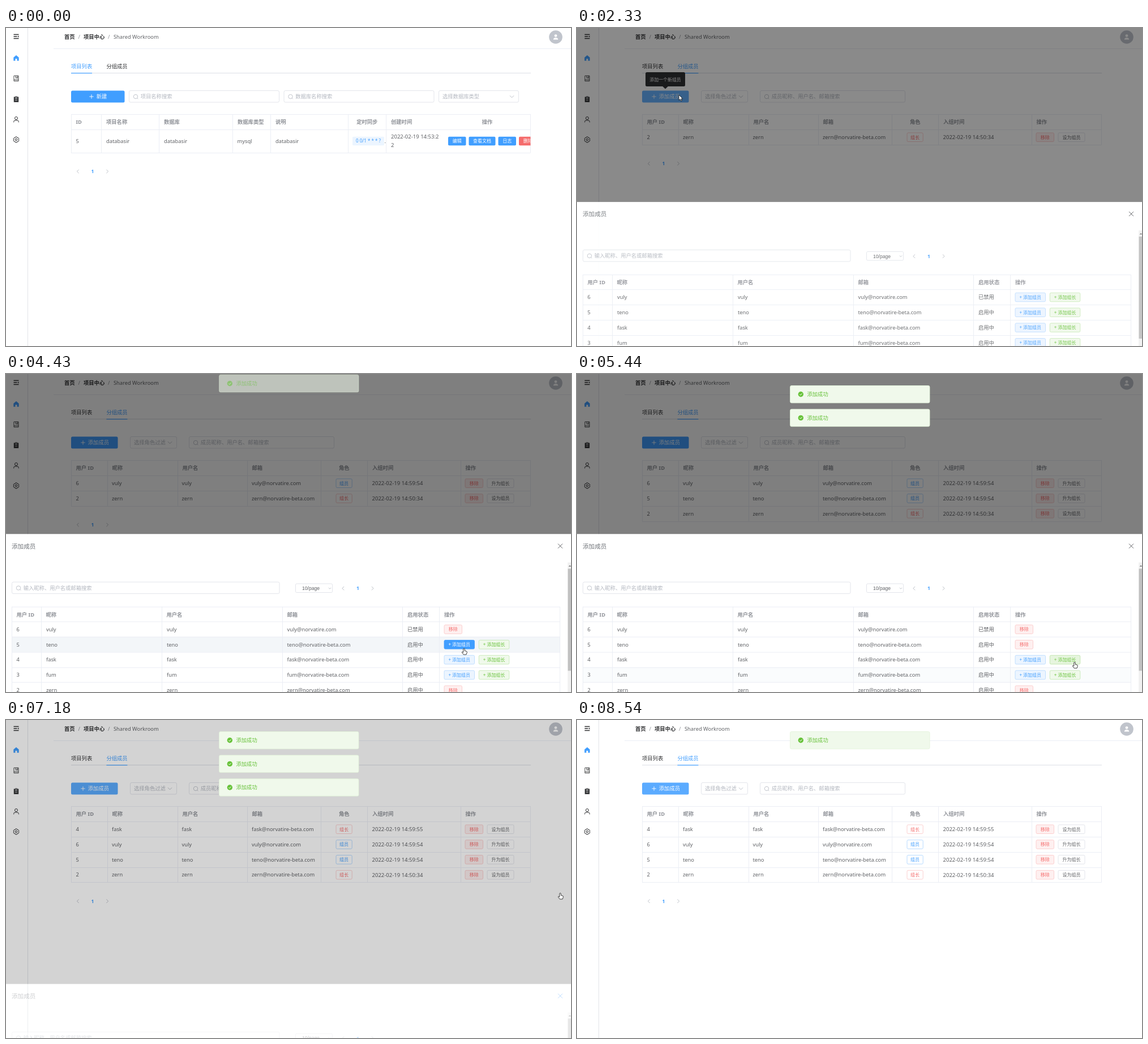
Animation, 998 px wide and 561 px high, one loop 8600 ms. Source, as an HTML page with a canvas:

```html
<!DOCTYPE html>
<html lang="zh-CN">
<head>
<meta charset="utf-8">
<style>
  html, body { margin: 0; width: 100%; height: 100%; overflow: hidden; background: #fff; }
  canvas { display: block; }
</style>
</head>
<body>
<canvas id="stage" width="998" height="561"></canvas>
<script>
const ctx = document.getElementById('stage').getContext('2d');
const LOOP = 8600;
const SANS = '"Noto Sans", "Noto Sans CJK SC", "Noto Sans CJK", sans-serif';
const BLUE = '#409eff', LIGHT_BLUE = '#66b1ff', RED = '#f56c6c', GREEN = '#67c23a';
const INK = '#303133', BODY = '#606266', GRAY = '#909399', HINT = '#b4b8c0', EDGE = '#dcdfe6', GRID = '#ebeef5';

// Timeline (ms)
const TAB_CLICK = 1100, OPEN = 2138, CLOSE = 7066, SLIDE = 300;
const JOINED = [4335, 5020, 5800], TOAST_LIFE = 3000;

const MAIL = '@norvatire-beta.com';
const user = (id, name, mail, role, time) => ({ id, name, mail: name + mail, role, time: '2022-02-19 14:' + time });
const vuly = user(6, 'vuly', '@norvatire.com', '组员', '59:54');
const teno = user(5, 'teno', MAIL, '组员', '59:54');
const fask = user(4, 'fask', MAIL, '组长', '59:55');
const fum = user(3, 'fum', MAIL);
const zern = user(2, 'zern', MAIL, '组长', '50:34');
const everyone = [vuly, teno, fask, fum, zern];

// [row, from, to] while the pointer is over a row or one of its buttons
const rowHovers = [[0, 3350, 4100], [1, 4100, 4840], [2, 4840, 4980], [3, 4980, 5370], [2, 5430, 6000]];
const buttonHovers = [[0, 3600, 4060], [1, 4200, 4780], [2, 5430, 5950]];

// [time, x, y, hand]
const route = [
  [200, 877, 512], [600, 450, 190], [860, 240, 40], [1010, 196, 66, 1], [1150, 196, 66], [1650, 180, 118],
  [2400, 180, 118], [2860, 640, 400], [3070, 640, 400], [3430, 850, 462, 1], [3680, 806, 453, 1],
  [3950, 806, 453, 1], [4250, 809, 484, 1], [4700, 809, 484], [5130, 860, 526], [5400, 879, 508, 1],
  [5900, 879, 508], [6430, 988, 400], [6800, 979, 305, 1], [7380, 979, 305], [8200, 972, 535], [8400, 966, 575]
];

const clamp = p => Math.max(0, Math.min(1, p));
function ease(p) {
  let low = 0, high = 1;
  for (let i = 0; i < 18; i++) {
    const u = (low + high) / 2;
    if (0.75 * u * (1 - u) + u ** 3 < p) low = u; else high = u;
  }
  const u = (low + high) / 2, v = 1 - u;
  return 0.3 * u * v * v + 3 * u * u * v + u ** 3;
}
const ramp = (t, start, duration) => {
  const p = clamp((t - start) / duration);
  return p === 0 || p === 1 ? p : ease(p);
};
const hovered = (list, row, t, fade) => list.reduce(
  (sum, [r, from, to]) => r === row ? sum + ramp(t, from, fade) - ramp(t, to, fade) : sum, 0);
function mix(a, b, p) {
  const part = (c, i) => parseInt(c.slice(i, i + 2), 16);
  return `rgb(${[1, 3, 5].map(i => Math.round(part(a, i) + (part(b, i) - part(a, i)) * p))})`;
}

function text(s, x, y, color = BODY, { size = 9.31, bold, align = 'left', font = SANS } = {}) {
  ctx.font = `${bold ? 'bold ' : ''}${size}px ${font}`;
  ctx.textAlign = align;
  ctx.fillStyle = color;
  ctx.fillText(s, x, y + size * 0.36);
}
const date = (s, x, y) => text(s, x, y, BODY, { size: 9.52 });
function box(x, y, w, h, fill, border, radius = 2.5) {
  ctx.beginPath();
  ctx.roundRect(x, y, w, h, radius);
  if (fill) { ctx.fillStyle = fill; ctx.fill(); }
  if (border) { ctx.strokeStyle = border; ctx.lineWidth = 0.8; ctx.stroke(); }
}
function rect(x, y, w, h, color) {
  ctx.fillStyle = color;
  ctx.fillRect(x, y, w, h);
}
function shape(d, x, y, { stroke, fill, width = 1 }) {
  const path = new Path2D(d);
  ctx.save();
  ctx.translate(x, y);
  ctx.lineWidth = width;
  ctx.lineJoin = 'round';
  if (fill) { ctx.fillStyle = fill; ctx.fill(path); }
  if (stroke) { ctx.strokeStyle = stroke; ctx.stroke(path); }
  ctx.restore();
}
function circle(x, y, r, fill, stroke) {
  ctx.beginPath();
  ctx.arc(x, y, r, 0, 7);
  if (fill) { ctx.fillStyle = fill; ctx.fill(); }
  if (stroke) { ctx.strokeStyle = stroke; ctx.lineWidth = 0.8; ctx.stroke(); }
}
function faded(alpha, draw) {
  if (alpha <= 0) return;
  ctx.save();
  ctx.globalAlpha = alpha;
  draw();
  ctx.restore();
}

function pill(label, x, y, w, fill, border, color) {
  box(x, y - 7.8, w, 15.6, fill, border, 2);
  text(label, x + w / 2, y, color, { size: 8, align: 'center' });
}
const removeButton = (x, y) => pill('移除', x, y, 31.5, '#fef0f0', '#fbc4c4', RED);
const chevronDown = (x, y) => shape('M-3.5-1.7 0 1.8 3.5-1.7', x, y, { stroke: HINT, width: 0.9 });
function search(x, y, w, hint) {
  box(x + 0.5, y - 10.5, w - 1, 20.5, '#fff', EDGE);
  circle(x + 12, y, 3.7, null, HINT);
  shape('M2.6 2.6 4.3 4.3', x + 12, y, { stroke: HINT, width: 0.8 });
  text(hint, x + 20.7, y, HINT);
}
function select(x, w, hint) {
  box(x + 0.5, 110.5, w - 1, 20.5, '#fff', EDGE);
  text(hint, x + 7, 121, HINT);
  chevronDown(x + w - 12.5, 121);
}
function primary(label, w, plusX, color) {
  box(115, 110.5, w, 21, color);
  shape('M-3.7 0H3.7M0-3.7V3.7', plusX, 121, { stroke: '#fff', width: 0.9 });
  text(label, plusX + 8.8, 121, '#fff');
}
function pager(x, y) {
  shape('M1.6-3.2-1.6 0 1.6 3.2M50.4-3.2 53.6 0 50.4 3.2', x, y, { stroke: HINT, width: 0.9 });
  text('1', x + 26, y, BLUE, { size: 8.6, bold: true, align: 'center' });
}
function grid(edges, top, bottoms, headers, centered) {
  const left = edges[0], right = edges[edges.length - 1], bottom = bottoms[bottoms.length - 1];
  for (const y of [top, ...bottoms]) rect(left, Math.round(y), right - left, 1, GRID);
  for (const x of edges) rect(Math.floor(x), top, 1, bottom - top, GRID);
  headers.forEach((label, i) => {
    const middle = i === centered;
    const x = middle ? (edges[i] + edges[i + 1]) / 2 : edges[i] + 8.5;
    text(label, x, top + 14, GRAY, { bold: true, align: middle ? 'center' : 'left' });
  });
}

function chrome(t) {
  rect(38, 0, 1, 561, '#e2e4e9');
  rect(84, 36, 914, 1, GRID);
  const dark = { stroke: INK, width: 1 };
  shape('M-4.5-3.5H4.5M-4.5 0H1.5M-4.5 3.5H4.5', 18, 15, { stroke: INK, width: 1.3 });
  shape('M4.5-1.8V1.8L2.3 0Z', 18, 15, { fill: INK });
  shape('M0-5 4.7-1V4.8H1.5V1.2H-1.5V4.8H-4.7V-1Z', 18, 53, { fill: BLUE });
  shape('M-4-4.7H4V4.7H-4ZM-4 2.4H4M-.5-4.7V-.2L1-1.4 2.5-.2V-4.7', 18, 89, { stroke: INK, width: 0.9 });
  shape('M-4.2-4H-2V-5H2V-4H4.2V5.2H-4.2Z', 18, 125.5, { fill: INK });
  shape('M-2.2-1.2H2.2M-2.2 1.7H2.2M-1.8-3.4H1.8', 18, 125.5, { stroke: '#fff', width: 0.8 });
  shape('M2.5-2.4A2.5 2.5 0 1 1-2.5-2.4 2.5 2.5 0 1 1 2.5-2.4M-4.3 5V3.8Q-4.3 1.5-2 1.5H2Q4.3 1.5 4.3 3.8V5', 18, 161.5, dark);
  shape('M-1.3-4.9H1.3L1.9-3.4 3.6-3.4 4.9-1.2 4 0 4.9 1.2 3.6 3.4 1.9 3.4 1.3 4.9H-1.3L-1.9 3.4-3.6 3.4-4.9 1.2-4 0-4.9-1.2-3.6-3.4-1.9-3.4ZM1.8 0A1.8 1.8 0 1 1-1.8 0 1.8 1.8 0 1 1 1.8 0', 18, 197, dark);
  text('首页', 103, 16, INK, { bold: true });
  text('/', 127.5, 16, GRAY);
  text('项目中心', 137, 16, INK, { bold: true });
  text('/', 180, 16, GRAY);
  text('Shared Workroom', 190, 16);
  circle(971, 16, 11.8, '#c0c4cc');
  circle(971, 13.6, 2.4, '#fff');
  shape('M-4.2 4.6Q-4.2 1 0 1T4.2 4.6Z', 971, 16, { fill: '#fff' });

  const moved = ramp(t, TAB_CLICK, SLIDE);
  rect(115, 79, 812, 1, EDGE);
  rect(115 + 62.4 * moved, 79, 37, 1.2, BLUE);
  text('项目列表', 115, 67.5, mix(BLUE, INK, moved));
  text('分组成员', 177.4, 67.5, mix(INK, BLUE, ramp(t, 950, 150)));
}

function projects() {
  primary('新建', 94.5, 151, BLUE);
  search(217, 121, 266, '项目名称搜索');
  search(490.5, 121, 266, '数据库名称搜索');
  select(764, 142, '选择数据库类型');
  grid([115, 168.5, 270.5, 400.5, 467.5, 604, 671.5, 926.5], 152, [179, 220],
    ['ID', '项目名称', '数据库', '数据库类型', '说明', '定时同步', '创建时间'], 5);
  text('操作', 850, 166, GRAY, { bold: true, align: 'center' });
  [['5', 123.5], ['databasir', 177], ['databasir', 279], ['mysql', 408.5], ['databasir', 476], ['.', 668.5]]
    .forEach(([s, x]) => text(s, x, 200));
  pill('0 0/1 * * * ?', 612, 199.5, 56, '#ecf5ff', null, BLUE);
  date('2022-02-19 14:53:2', 680, 192);
  date('2', 680, 207);
  ctx.save();
  ctx.beginPath();
  ctx.rect(772, 180, 154.5, 40);
  ctx.clip();
  [['编辑', 781, 31.5], ['查看文档', 817.5, 47], ['日志', 869.5, 31.5], ['删除', 906, 31.5]]
    .forEach(([label, x, w], i) => pill(label, x, 199.5, w, i < 3 ? BLUE : RED, null, '#fff'));
  ctx.restore();
  pager(127, 253);
}

function members(t) {
  const list = [vuly, teno].filter((_, i) => t >= JOINED[i]).concat(zern);
  if (t >= JOINED[2]) list.unshift(fask);
  const press = ramp(t, 2040, 60) - ramp(t, OPEN, 100);
  const focus = ramp(t, 1550, 100) - ramp(t, 2600, 200) + ramp(t, CLOSE - 40, 100) * 0.7;
  primary('添加成员', 82.5, 136, press > 0 ? mix(LIGHT_BLUE, '#3a8ee6', press) : mix(BLUE, LIGHT_BLUE, focus));
  select(219, 83, '选择角色过滤');
  search(323, 121, 257, '成员昵称、用户名、邮箱搜索');
  grid([115, 179, 303, 426, 556, 638.5, 803, 926.5], 152, [179, ...list.map((_, i) => 206 + 26.8 * i)],
    ['用户 ID', '昵称', '用户名', '邮箱', '角色', '入组时间', '操作'], 4);
  list.forEach((m, i) => {
    const y = 192.7 + 26.8 * i, lead = m.role === '组长';
    [[m.id, 123.5], [m.name, 187], [m.name, 310.5], [m.mail, 434]]
      .forEach(([s, x]) => text(s, x, y));
    date(m.time, 646.5, y);
    pill(m.role, 583, y, 28.2, '#fff', lead ? '#fbc4c4' : '#a6d2ff', lead ? RED : BLUE);
    removeButton(811, y);
    pill(lead ? '设为组员' : '升为组长', 850, y, 47, '#fff', EDGE, BODY);
  });
  pager(127, 212.4 + 26.8 * list.length);
  faded(ramp(t, 1680, 150) - ramp(t, 2400, 200), () => {
    box(121, 78, 70, 25, INK);
    shape('M-5 0H5L0 4.8Z', 156, 102.8, { fill: INK });
    text('添加一个新组员', 156, 90.7, '#fff', { size: 7.95, align: 'center' });
  });
}

function drawer(t, top) {
  ctx.save();
  ctx.translate(0, top);
  rect(0, 0, 998, 279, '#fff');
  text('添加成员', 10, 21.5, '#72767b', { size: 10.6 });
  shape('M-4-4 4 4M4-4-4 4', 979, 21, { stroke: mix(BODY, BLUE, ramp(t, 6750, 150)), width: 1 });
  search(10, 95, 473.5, '输入昵称、用户名或邮箱搜索');
  box(511.5, 87.5, 65, 15.5, '#fff', EDGE, 2);
  text('10/page', 523, 95.5, BODY, { size: 8.6, font: '"Liberation Sans", sans-serif' });
  shape('M-2.2-1 0 1.2 2.2-1', 572, 95.5, { stroke: HINT, width: 0.8 });
  pager(595.5, 95.7);
  rect(992, 50, 6, 229, '#f1f1f1');
  shape('M-2.4 1.3H2.4L0-1.3Z', 996, 56, { fill: '#808080' });
  rect(992.5, 61, 5.5, 180, '#c1c1c1');

  everyone.forEach((_, i) => faded(hovered(rowHovers, i, t, 200), () =>
    rect(10, 154.5 + 26.8 * i, 968, 26.8, '#f3f6f9')));
  grid([10, 62, 275, 488, 700.5, 765.5, 978], 128, [154, ...everyone.map((_, i) => 181 + 26.8 * i)],
    ['用户 ID', '昵称', '用户名', '邮箱', '启用状态', '操作']);
  everyone.forEach((m, i) => {
    const y = 168 + 26.8 * i;
    [[m.id, 18.5], [m.name, 71], [m.name, 284], [m.mail, 496.5], [i ? '启用中' : '已禁用', 709]]
      .forEach(([s, x]) => text(s, x, y));
    if (m === zern || t >= JOINED[i]) return removeButton(774, y);
    const hot = hovered(buttonHovers, i, t, 130);
    const add = (label, x, colors, p) => pill(label, x, y, 53.5,
      mix(colors[0], colors[2], p), mix(colors[1], colors[2], p), mix(colors[2], '#ffffff', p));
    add('+ 添加组员', 774, ['#ecf5ff', '#b3d8ff', BLUE], i < 2 ? hot : 0);
    add('+ 添加组长', 835.3, ['#f0f9eb', '#c2e7b0', GREEN], i < 2 ? 0 : hot);
  });
  ctx.restore();
}

function modal(t) {
  const shown = ramp(t, OPEN, SLIDE) - ramp(t, CLOSE, SLIDE);
  const top = 561 - 278.5 * shown;
  faded(shown, () => {
    rect(0, 0, 998, top, 'rgba(0, 0, 0, .5)');
    drawer(t, top);
  });
}

function toasts(t) {
  JOINED.forEach((start, i) => {
    const end = start + TOAST_LIFE;
    let slot = i;
    for (let k = 0; k < i; k++) slot -= ramp(t, JOINED[k] + TOAST_LIFE, 400);
    const lift = 1 - ramp(t, start, 400) + ramp(t, end, 400);
    const y = 20 + 41.6 * slot - 31 * lift;
    faded(ramp(t, start, 300) - ramp(t, end, 300), () => {
      box(376.5, y + 0.5, 246.5, 30.5, '#f0f9eb', '#e1f3d8');
      circle(395.3, y + 15.8, 4.7, GREEN);
      shape('M-2.2 0-.6 1.6 2.3-1.4', 395.3, y + 15.8, { stroke: '#fff', width: 1 });
      text('添加成功', 406.5, y + 15.8, GREEN);
    });
  });
}

function pointer(t) {
  const i = route.findIndex(point => point[0] > t);
  if (i < 1) return;
  const [t0, x0, y0, hand] = route[i - 1], [t1, x1, y1] = route[i];
  const p = (t - t0) / (t1 - t0), s = p * p * (3 - 2 * p);
  const d = hand
    ? 'M-1.2 1Q0-1 1.2 1V4.3L4 5Q5.6 5.4 5.3 7.3L4 11H-.8L-3.7 7.2Q-3.6 5.8-2.3 6.4L-1.2 7.3Z'
    : 'M0 0V9.5L2.2 7.4 3.8 11 5.3 10.3 3.8 6.9H6.8Z';
  shape(d, x0 + (x1 - x0) * s, y0 + (y1 - y0) * s, { fill: '#fff', stroke: '#111', width: 0.8 });
}

function frame() {
  const t = performance.now() % LOOP;
  rect(0, 0, 998, 561, '#fff');
  chrome(t);
  if (t < TAB_CLICK) projects(); else members(t);
  modal(t);
  toasts(t);
  pointer(t);
  requestAnimationFrame(frame);
}
frame();
</script>
</body>
</html>
```
